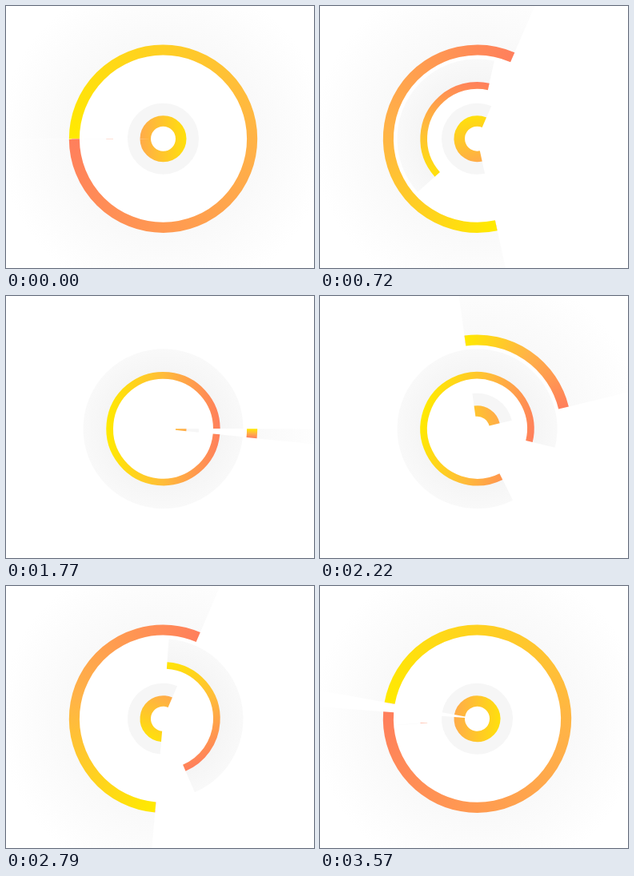
Animation of 385 by 328 pixels, one loop 3600 ms. Source, as an HTML page with a canvas:

```html
<!DOCTYPE html>
<html lang="en">
<head>
<meta charset="utf-8">
<title>Rotating rings</title>
<style>
  html, body { margin: 0; width: 100%; height: 100%; overflow: hidden; background: #fff; }
  canvas { display: block; width: 385px; height: 328px; }
</style>
</head>
<body>
<canvas id="stage"></canvas>
<script>
const W = 385, H = 328, CX = 196.5, CY = 166.2, LOOP = 3600, TAU = Math.PI * 2;
const YELLOW = '#ffea00', AMBER = '#ffb347', CORAL = '#ff7f5c';

const canvas = document.getElementById('stage');
const ctx = canvas.getContext('2d');
const dpr = window.devicePixelRatio || 1;
canvas.width = W * dpr;
canvas.height = H * dpr;

const easeIn = x => 1.5 * x * x - 0.5 * x ** 3;
const smooth = x => x * x * (3 - 2 * x);

function addStops(gradient, stops) {
  stops.forEach(([at, color]) => gradient.addColorStop(at, color));
  return gradient;
}

// Linear gradient across a circle, running towards the given angle
function across(r, angle, stops) {
  const x = r * Math.cos(angle), y = r * Math.sin(angle);
  return addStops(ctx.createLinearGradient(-x, -y, x, y), stops);
}

// Gradient that follows the arc from its start to its end
function along(start, sweep) {
  const part = Math.min(1, sweep / TAU);
  return addStops(ctx.createConicGradient(start, 0, 0),
    [[0, YELLOW], [part / 2, AMBER], [part, CORAL]]);
}

function halo(r0, r1, from, to) {
  return addStops(ctx.createRadialGradient(0, 0, r0, 0, 0, r1), [[0, from], [1, to]]);
}

function band(r0, r1, start, sweep, paint) {
  if (sweep <= 0) return;
  ctx.beginPath();
  ctx.arc(0, 0, (r0 + r1) / 2, start, start + sweep);
  ctx.lineWidth = r1 - r0;
  ctx.strokeStyle = paint;
  ctx.stroke();
}

function draw(ms) {
  const d = 1 - 2 * (ms % LOOP) / LOOP;
  const a = Math.abs(d);
  const turn = Math.PI * Math.sign(d) * easeIn(a);

  const sweep = TAU * a;
  const start = d > 0 ? turn : turn - sweep;
  const midSweep = TAU * (1 - (d > 0 ? a : smooth(a)));
  const midStart = -turn - midSweep;

  ctx.setTransform(dpr, 0, 0, dpr, 0, 0);
  ctx.fillStyle = '#fff';
  ctx.fillRect(0, 0, W, H);
  ctx.translate(CX, CY);

  band(117, 205, start, sweep, halo(117, 205, '#f9f9f9', '#ffffff'));
  band(70, 100, midStart, midSweep, halo(70, 100, '#f5f5f5', '#f9f9f9'));
  band(28, 44.5, start, sweep, '#f6f6f6');

  band(104.6, 117.7, start, sweep, along(start, sweep));
  band(62.5, 71.2, midStart, midSweep,
    across(71, -turn, [[0, YELLOW], [0.5, '#ffbc3a'], [1, CORAL]]));
  band(15.5, 29, start, sweep,
    across(29, turn - Math.PI, [[0, '#ffab4a'], [1, '#ffe00c']]));
}

const begin = performance.now();
function tick() {
  draw(performance.now() - begin);
  requestAnimationFrame(tick);
}
tick();
</script>
</body>
</html>
```
